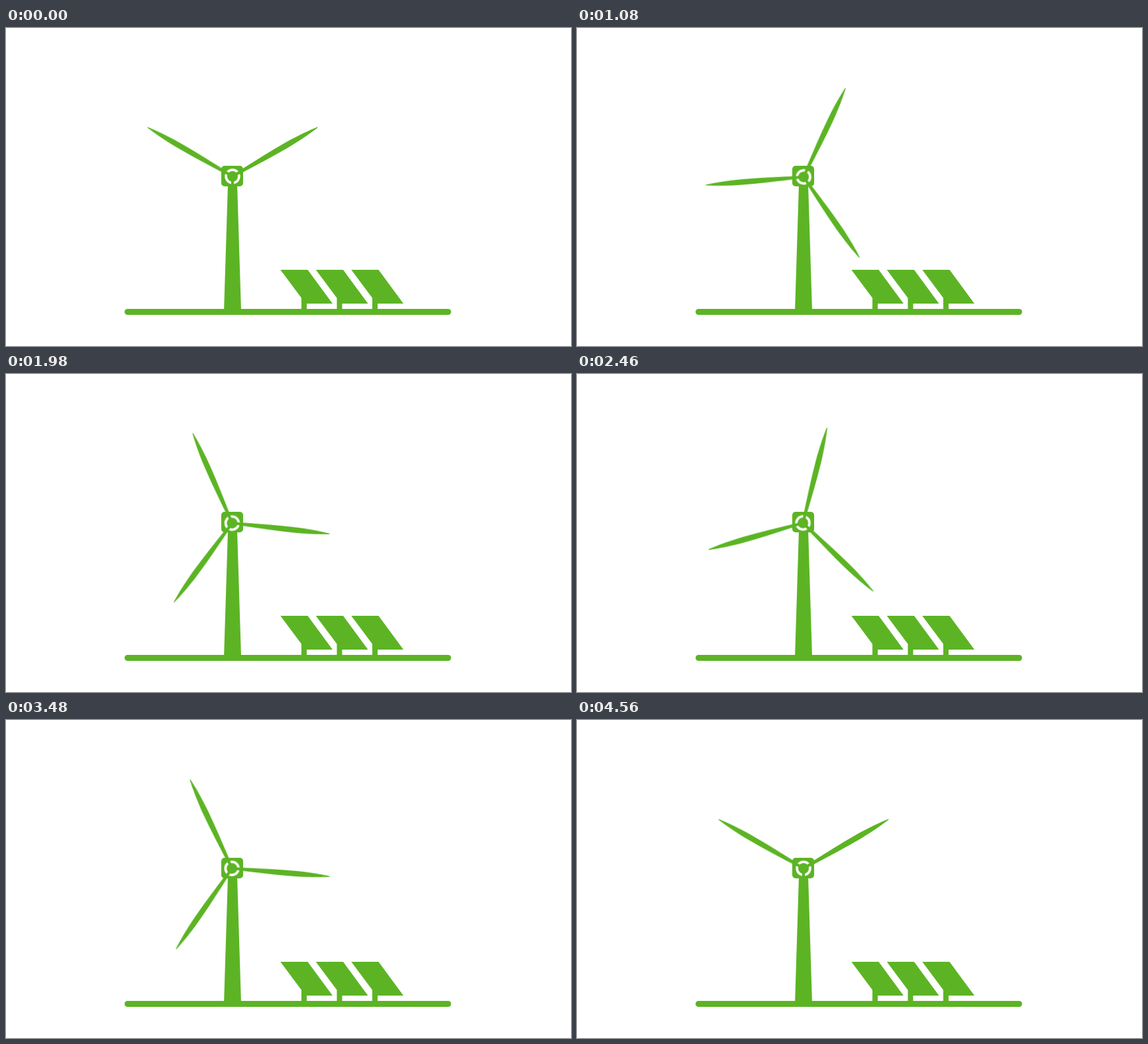
Recreate the animation shown at these times as an HTML page. Size 853 by 480 pixels, loop 4620 ms.

```html
<!DOCTYPE html>
<html lang="en">
<head>
<meta charset="utf-8">
<title>Wind and solar</title>
<style>
  html, body { margin: 0; width: 100%; height: 100%; overflow: hidden; background: #fff; }
  svg { display: block; width: 100%; height: 100%; fill: #5cb424; }
  #rotor { transform-origin: 341.6px 224.45px; }
</style>
</head>
<body>
<svg viewBox="0 0 853 480">
  <defs>
    <path id="blade" d="M-1.9 0 L-2.3 -14 C-3.2 -40 -4.4 -68 -4.2 -94 C-4 -116 -2.2 -136 -.5 -148 Q0 -149 .5 -148 C2.2 -136 4 -116 4.2 -94 C4.4 -68 3.2 -40 2.3 -14 L1.9 0 Z"/>
    <path id="panel" d="M414.3 365 H455.5 L493 416 H454 V426 H446 V407.5 Z"/>
  </defs>
  <rect x="179" y="424" width="493" height="9" rx="4.5"/>
  <path d="M335 236 H349 L355 428 H329 Z"/>
  <use href="#panel"/>
  <use href="#panel" x="53.5"/>
  <use href="#panel" x="107"/>
  <rect x="325" y="208" width="33" height="31" rx="5"/>
  <g id="rotor">
    <g transform="translate(342 224)">
      <circle r="11.7" fill="#fff"/>
      <circle r="8"/>
      <use href="#blade" transform="rotate(60)"/>
      <use href="#blade" transform="rotate(180)"/>
      <use href="#blade" transform="rotate(300)"/>
    </g>
  </g>
</svg>
<script>
  // One full turn takes 76 ticks; the closing pose is held for one more.
  const TICK = 60, TURN = 76, TICKS = TURN + 1;

  document.getElementById('rotor').animate(
    [
      { transform: 'rotate(0deg)' },
      { transform: `rotate(${360 * TICKS / TURN}deg)` }
    ],
    { duration: TICK * TICKS, easing: `steps(${TICKS}, end)`, iterations: Infinity }
  );
</script>
</body>
</html>
```
